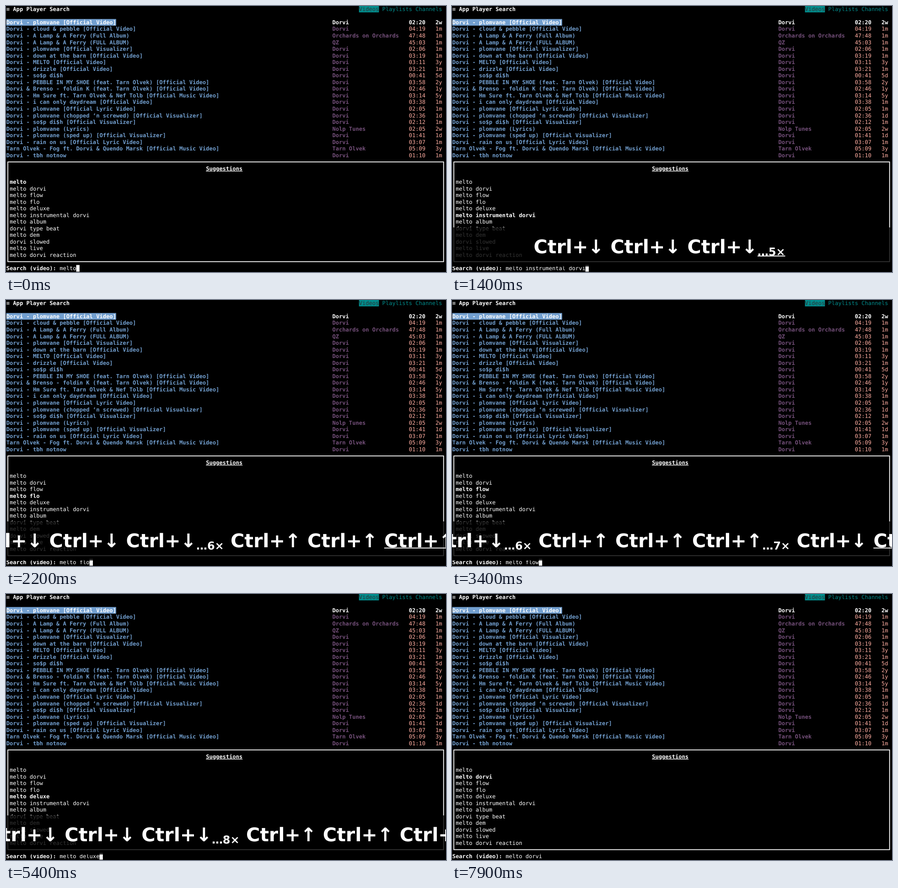
These frames come from a looping animation (962x582 px, 8000 ms). An HTML page:

```html
<!DOCTYPE html>
<html lang="en">
<head>
<meta charset="utf-8">
<title>Player search</title>
<style>
  html, body { margin: 0; width: 100%; height: 100%; overflow: hidden; background: #000; }
  svg { display: block; width: 962px; height: 582px; text-rendering: geometricPrecision; }
  text { font: 12.08px "DejaVu Sans Mono", monospace; fill: #fff; white-space: pre; }
  .bold { font-weight: bold; }
  .title { fill: #729fcf; font-weight: bold; }
  .channel { fill: #75507b; font-weight: bold; }
  .meta { fill: #ffaca0; }
  .tab { fill: #008b8b; }
  .tab.on { fill: #2e3436; }
  .keys { font: bold 41.25px "DejaVu Sans", sans-serif; }
  .count { font-size: 23.9px; }
</style>
</head>
<body>
<svg id="stage" viewBox="0 0 962 582"></svg>
<script>
const CELL = 7.2727, ROW = 14.545, LEFT = 0.8, TOP = -0.6, BASE = 11.4, LOOP = 8000;
const stage = document.getElementById('stage');

function add(name, attrs, parent = stage) {
  const node = document.createElementNS('http://www.w3.org/2000/svg', name);
  for (const key in attrs) node.setAttribute(key, attrs[key]);
  return parent.appendChild(node);
}
const colX = col => LEFT + col * CELL;
const rowY = row => TOP + row * ROW;

function print(row, col, string, cls = '') {
  const node = add('text', { x: colX(col), y: rowY(row) + BASE, class: cls });
  node.textContent = string;
  return node;
}
const cells = (row, col, count, fill) =>
  add('rect', { x: colX(col), y: rowY(row), width: count * CELL, height: ROW, fill });

// title | channel (default Dorvi) | length | age
const results = `
Dorvi - plomvane [Official Video]||02:20|2w
Dorvi - cloud & pebble [Official Video]||04:19|1m
Dorvi - A Lamp & A Ferry (Full Album)|Orchards on Orchards|47:48|1m
Dorvi - A Lamp & A Ferry (FULL ALBUM)|QZ|45:03|1m
Dorvi - plomvane [Official Visualizer]||02:06|1m
Dorvi - down at the barn [Official Video]||03:19|1m
Dorvi - MELTO [Official Video]||03:11|3y
Dorvi - drizzle [Official Video]||03:21|1m
Dorvi - so$p di$h||00:41|5d
Dorvi - PEBBLE IN MY SHOE (feat. Tarn Olvek) [Official Video]||03:58|2y
Dorvi & Brenso - foldin K (feat. Tarn Olvek) [Official Video]||02:46|1y
Dorvi - Hm Sure ft. Tarn Olvek & Nef Tolb [Official Music Video]||03:14|5y
Dorvi - i can only daydream [Official Video]||03:38|1m
Dorvi - plomvane [Official Lyric Video]||02:05|1m
Dorvi - plomvane (chopped ‘n screwed) [Official Visualizer]||02:36|1d
Dorvi - so$p di$h [Official Visualizer]||02:12|1m
Dorvi - plomvane (Lyrics)|Nolp Tunes|02:05|2w
Dorvi - plomvane (sped up) [Official Visualizer]||01:41|1d
Dorvi - rain on us [Official Lyric Video]||03:07|1m
Tarn Olvek - Fog ft. Dorvi & Quendo Marsk [Official Music Video]|Tarn Olvek|05:09|3y
Dorvi - tbh notnow||01:10|1m`.trim().split('\n').map(line => line.split('|'));

const suggestions = ['melto', 'melto dorvi', 'melto flow', 'melto flo', 'melto deluxe',
  'melto instrumental dorvi', 'melto album', 'dorvi type beat', 'melto dem',
  'dorvi slowed', 'melto live', 'melto dorvi reaction'];

// Header
print(0, 0, '≡');
print(0, 2, 'App Player Search', 'bold');
cells(0, 106, 6, '#008b8b');
print(0, 106, 'Videos', 'tab on');
print(0, 113, 'Playlists', 'tab');
print(0, 123, 'Channels', 'tab');

// Result list
cells(2, 0, results[0][0].length, '#729fcf');
results.forEach(([title, channel, length, age], i) => {
  const cls = name => i ? name : 'bold';
  print(i + 2, 0, title, cls('title'));
  print(i + 2, 98, channel || 'Dorvi', cls('channel'));
  print(i + 2, 121, length, cls('meta'));
  print(i + 2, 129, age, cls('meta'));
});

// Suggestion box
add('rect', { x: 4, y: rowY(23.5), width: 131 * CELL, height: 15 * ROW,
  fill: 'none', stroke: '#fff', 'stroke-width': 1.8 });
print(24, 60, 'Suggestions', 'bold').setAttribute('text-decoration', 'underline');
const items = suggestions.map((s, i) => print(26 + i, 1, s));

// Prompt
print(39, 0, 'Search (video):', 'bold');
const input = print(39, 16, '');
const cursor = cells(39, 16, 1, '#fff');

// Pressed-key overlay
const overlay = add('g', {});
add('rect', { x: 0, y: 484.4, width: 962, height: 85.6, fill: '#000', 'fill-opacity': 0.8 }, overlay);
const keys = add('text', { y: 540.6, class: 'keys' }, overlay);
const mark = add('rect', { height: 1.9, fill: '#fff' }, overlay);
const COUNT_DROP = 5.4;

// Evenly spaced presses; the list stops at its first entry
const PRESS_GAP = 162;
const runs = [
  { start: 685, count: 6, step: 1 },
  { start: 1855, count: 7, step: -1 },
  { start: 3225, count: 8, step: 1 },
  { start: 4855, count: 7, step: -1 }
];
// The screen repaints every 100 ms, except during these stalls
const stalls = [[2600, 3400], [3400, 3700], [3700, 4200], [4200, 4500], [5100, 5400], [5700, 6000]];

function paintTime(t) {
  const stall = stalls.find(([from, to]) => t >= from && t < to);
  return stall ? stall[0] : Math.floor(t / 100) * 100;
}

function stateAt(t) {
  let index = 0, lastPress = -270;
  const pressed = [];
  for (const { start, count, step } of runs) {
    if (t < start) break;
    const done = Math.min(count, Math.floor((t - start) / PRESS_GAP) + 1);
    pressed.push({ done, arrow: step > 0 ? '↓' : '↑' });
    index = Math.max(0, index + step * done);
    lastPress = start + (done - 1) * PRESS_GAP;
  }
  const age = t - lastPress;
  return {
    index, pressed,
    blink: Math.floor(Math.max(0, age - 120) / 650) % 2 === 0,
    marked: age < 200,
    overlaid: pressed.length > 0 && age < 950
  };
}

function drawKeys(pressed, marked) {
  keys.textContent = '';
  let last, lowered = false;
  const span = (string, attrs = {}) => {
    const node = add('tspan', attrs, keys);
    node.textContent = string;
    return node;
  };
  pressed.forEach(({ done, arrow }, run) => {
    for (let i = 0; i < Math.min(done, 3); i++) {
      if (run || i) span(' ', lowered ? { dy: -COUNT_DROP } : {});
      last = span('Ctrl+' + arrow);
      lowered = false;
    }
    if (done > 3) {
      last = span(`…${done}×`, { class: 'count', dy: COUNT_DROP });
      lowered = true;
    }
  });
  // Centred until too wide, then held at the right end
  const width = keys.getComputedTextLength();
  const x = Math.min(453.5 - width / 2, 1075 - width);
  const lastWidth = last.getComputedTextLength();
  keys.setAttribute('x', x);
  mark.setAttribute('x', x + width - lastWidth);
  mark.setAttribute('y', lowered ? 546.1 : 541.7);
  mark.setAttribute('width', lastWidth);
  mark.style.display = marked ? '' : 'none';
}

let painted = -1;
function draw(t) {
  const time = paintTime(t);
  if (time === painted) return;
  painted = time;
  const { index, pressed, blink, marked, overlaid } = stateAt(time);
  items.forEach((item, i) => item.classList.toggle('bold', i === index));
  input.textContent = suggestions[index];
  cursor.setAttribute('x', colX(16 + suggestions[index].length));
  cursor.style.display = blink ? '' : 'none';
  overlay.style.display = overlaid ? '' : 'none';
  if (overlaid) drawKeys(pressed, marked);
}

const start = performance.now();
function tick() {
  draw((performance.now() - start) % LOOP);
  requestAnimationFrame(tick);
}
tick();
</script>
</body>
</html>
```
